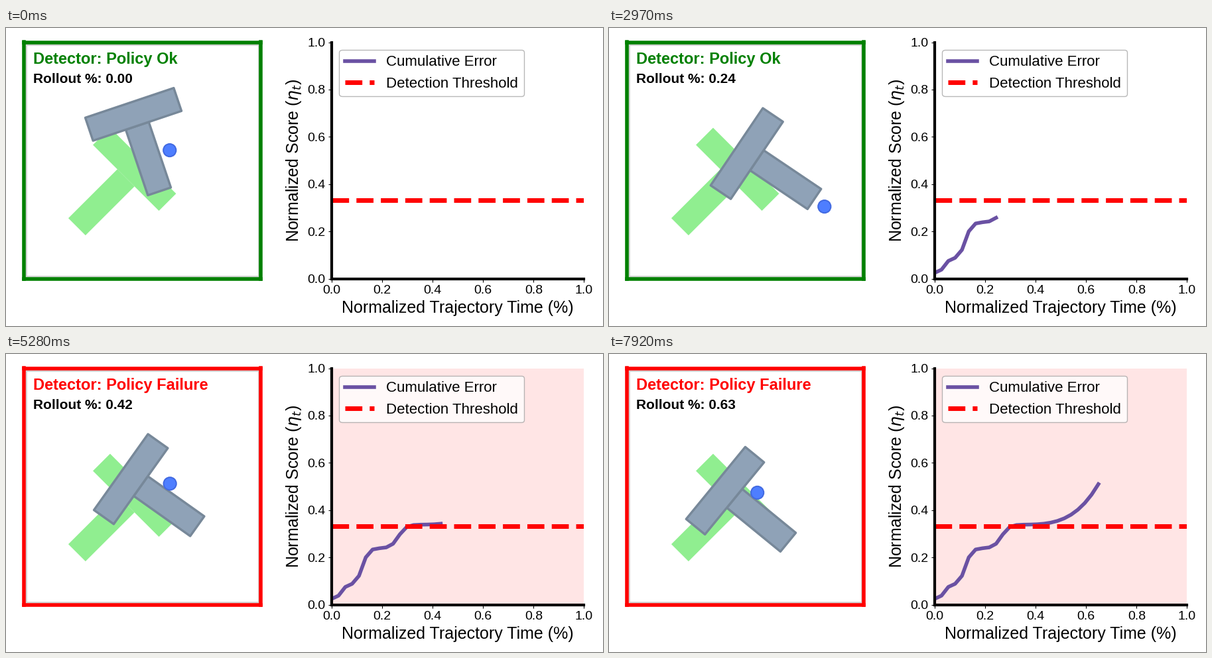
Animation of 900x450 px, one loop 8000 ms. Source, as a matplotlib script:

```python
import numpy as np
import matplotlib.pyplot as plt
from matplotlib.animation import FuncAnimation
from matplotlib.patches import Circle, Polygon, Rectangle

W, H, DPI = 900, 450, 100
PX = 72 / DPI                      # points per pixel
INTERVAL, FRAMES = 50, 160
STEP_MS, STEPS = 330, 25
THRESHOLD, FAIL_STEP = 0.332, 12

plt.rcParams["font.family"] = "Liberation Sans"

# T block, measured from the centre of its bar
BAR_HALF, THICK_HALF, STEM_END = 70.3, 18.3, 122.7
GOAL = (194, 213.7, 135)

# block poses are centre x, y and stem angle; it rests between pushes
START = (192.3, 130.8, 71.4)
PUSHES = [                         # first step, last step, new pose
    (3, 5, (201.0, 176.5, 44.3)),
    (5, 6, (208.0, 190.0, 34.0)),
    (9, 10, (193.3, 182.3, 32.2)),
    (14, 16, (188.5, 189.3, 35.4)),
    (16, 18, (181.3, 199.2, 37.6)),
    (19, 21, (178.8, 202.7, 38.4)),
    (21, 24, (175.3, 206.8, 39.3)),
]

# free path of the pusher: step, x, y
SLIDE_STEP = 16
PATH = np.array([
    (0, 247, 185), (2, 292, 112), (3, 225, 66), (4, 137, 124),
    (5, 144, 195), (6, 135.5, 195), (7, 220, 78), (9, 325, 270),
    (10, 310, 254), (12, 327.5, 129), (14, 264, 165), (16, 247, 196.5),
])


def block_pose(n):
    pose = np.array(START)
    for first, last, goal in PUSHES:
        u = np.clip((n - first) / (last - first), 0, 1)
        pose = pose + (np.array(goal) - pose) * u ** 1.5
    return pose


def on_block(pose, along, across):
    """Stage position of a point given along and across the stem."""
    x, y, angle = pose
    c, s = np.cos(np.radians(angle)), np.sin(np.radians(angle))
    return x + along * c + across * s, y + along * s - across * c


def block_part(pose, near, far, half):
    corners = [(near, -half), (near, half), (far, half), (far, -half)]
    return [on_block(pose, u, w) for u, w in corners]


def block_parts(pose):
    return (block_part(pose, THICK_HALF, STEM_END, THICK_HALF),
            block_part(pose, -THICK_HALF, THICK_HALF, BAR_HALF))


def pusher_at(n):
    if n < SLIDE_STEP:
        return [np.interp(n, PATH[:, 0], PATH[:, k]) for k in (1, 2)]
    # slide along the upper side of the stem, slowing down
    v = (n - SLIDE_STEP) / (STEPS - 1 - SLIDE_STEP)
    return on_block(block_pose(n), 52 - 12.5 * v * (2 - v), 28.5)


def score(n):
    """Three sudden rises, then a growing tail."""
    total = 0.024 + 0.171 * np.clip((n - 12) / 12, 0, None) ** 3.46
    for height, middle, width in [(0.06, 1.4, 0.35), (0.155, 4.5, 0.45),
                                  (0.1, 9.8, 0.55)]:
        total = total + height / (1 + np.exp((middle - n) / width))
    return total


fig, (scene, chart) = plt.subplots(1, 2, figsize=(W / DPI, H / DPI), dpi=DPI,
                                   facecolor="white")

# scene, with stage pixels as data units
scene.set(xlim=(27, 384), ylim=(379, 22), xticks=[], yticks=[],
          aspect="equal")
scene.spines[:].set_linewidth(4)
scene.add_patch(Rectangle((30.5, 25.5), 350.5, 349.5, fill=False,
                          ec="lightgray", lw=2.8 * PX, zorder=1))


def add_block(pose, **style):
    return [scene.add_patch(Polygon(xy, **style)) for xy in block_parts(pose)]


add_block(GOAL, fc="lightgreen", ec="none", zorder=2)
block = add_block(START, fc="#8fa2b7", ec="#778899", lw=3.4 * PX,
                  joinstyle="round", zorder=3)
pusher = scene.add_patch(Circle(pusher_at(0), 9.6, fc="#4e7eff", ec="#4169e1",
                                lw=2 * PX, zorder=4))
verdict = scene.text(41, 54, "", size=17, weight="bold")
rollout = scene.text(41, 83.3, "", size=15, weight="bold")

# score chart
chart.set(xlim=(0, 1), ylim=(0, 1))
chart.spines[["top", "right"]].set_visible(False)
chart.spines[["left", "bottom"]].set_linewidth(3)
chart.tick_params(labelsize=14)
chart.set_xlabel("Normalized Trajectory Time (%)", size=18)
chart.set_ylabel(r"Normalized Score ($\eta_t$)", size=18)

curve, = chart.plot([], [], color="#6a51a3", lw=4, label="Cumulative Error")
chart.axhline(THRESHOLD, color="red", ls="--", lw=5,
              label="Detection Threshold")
alarm = chart.axvspan(0, 1, color="red", alpha=0.1, lw=0)
chart.legend(loc="upper left", fontsize=16, edgecolor="0.65")

fig.tight_layout()
fig.subplots_adjust(wspace=0.251)


def show_step(n):
    for part, xy in zip(block, block_parts(block_pose(n))):
        part.set_xy(xy)
    pusher.center = pusher_at(n)

    failed = n >= FAIL_STEP
    color = "red" if failed else "green"
    scene.spines[:].set_color(color)
    verdict.set_color(color)
    verdict.set_text("Detector: Policy " + ("Failure" if failed else "Ok"))
    rollout.set_text(f"Rollout %: {n / 38:.2f}")
    alarm.set_visible(failed)

    done = np.arange(n + 1 if n else 0)
    curve.set_data(done / 37, score(done))
    return *block, pusher, verdict, rollout, alarm, curve


def update(i):
    return show_step(((i + 1) * INTERVAL - 1) // STEP_MS)


def reset():
    return show_step(0)


anim = FuncAnimation(fig, update, frames=FRAMES, init_func=reset,
                     interval=INTERVAL, repeat=True, repeat_delay=0,
                     blit=False)
plt.show()
```
